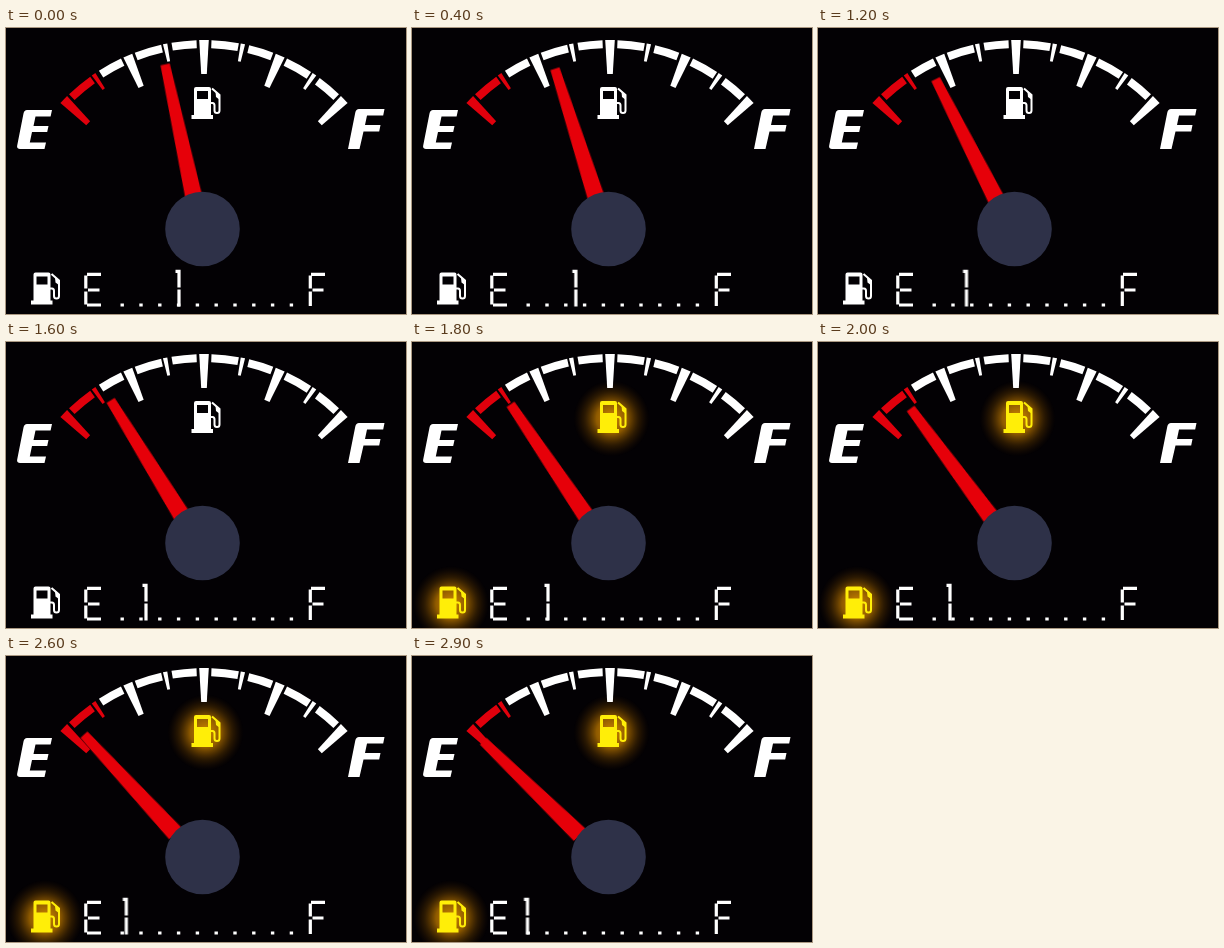
Animation, 400 px wide and 286 px high, one loop 3000 ms. Source, as an HTML page:

```html
<!DOCTYPE html>
<html lang="en">
<head>
<meta charset="utf-8">
<title>Fuel gauge</title>
<style>
  html, body { margin: 0; width: 100%; height: 100%; overflow: hidden; background: #030104; }
  svg { display: block; width: 400px; height: 286px; }

  .needle, .marker, .pumps, .glow { animation: 3s infinite; }
  .needle { fill: #e60009; animation-name: sweep; }
  .marker { animation-name: slide; }
  .pumps { color: #fff; animation-name: warn; animation-timing-function: step-end; }
  .glow { opacity: 0; animation-name: shine; animation-timing-function: step-end; }
  .lcd { fill: none; stroke: #fff; stroke-width: 3.2; }

  @keyframes sweep {
    0% { transform: rotate(-12.2deg); animation-timing-function: steps(7); }
    23.3333% { transform: rotate(-21.9deg); animation-timing-function: steps(5); }
    40% { transform: rotate(-26.8deg); animation-timing-function: steps(4); }
    53.3333% { transform: rotate(-31.7deg); animation-timing-function: steps(4); }
    66.6667% { transform: rotate(-36.5deg); animation-timing-function: steps(4); }
    80% { transform: rotate(-40.7deg); animation-timing-function: steps(5); }
    96.6667%, 100% { transform: rotate(-45.9deg); }
  }
  @keyframes slide {
    0% { transform: translateX(173px); animation-timing-function: steps(7); }
    23.3333% { transform: translateX(157px); animation-timing-function: steps(5); }
    40% { transform: translateX(148.5px); animation-timing-function: steps(4); }
    53.3333% { transform: translateX(140px); animation-timing-function: steps(4); }
    66.6667% { transform: translateX(132px); animation-timing-function: steps(4); }
    80% { transform: translateX(123.5px); animation-timing-function: steps(5); }
    96.6667%, 100% { transform: translateX(115.5px); }
  }
  @keyframes warn { 0% { color: #fff; } 60%, 100% { color: #ffee08; } }
  @keyframes shine { 0% { opacity: 0; } 60%, 100% { opacity: 1; } }
</style>
</head>
<body>
<svg viewBox="0 0 400 286" role="img" aria-label="Fuel gauge running from F to E">
  <defs>
    <radialGradient id="halo">
      <stop offset="0" stop-color="#d28a00"/>
      <stop offset=".4" stop-color="#a86a00" stop-opacity=".85"/>
      <stop offset=".7" stop-color="#6e4200" stop-opacity=".4"/>
      <stop offset="1" stop-color="#3a2000" stop-opacity="0"/>
    </radialGradient>
    <g id="pump">
      <path fill="currentColor" fill-rule="evenodd"
        d="M4.500 1H17.500Q19.500 1 19.500 3V29H21.500V33H0V29H2.500V3Q2.500 1 4.500 1ZM5.500 5V13H16.500V5Z"/>
      <path fill="none" stroke="currentColor" stroke-width="2"
        d="M19 17H21Q23 17 23 19.500V24.500Q23 27 25.500 27T28 24.500V9L20.500 2.500"/>
      <path fill="currentColor" d="M24 6L28.500 9.500V14L24.500 11Z"/>
    </g>
  </defs>

  <rect width="400" height="286" fill="#030104"/>
  <g class="glow" fill="url(#halo)">
    <circle cx="199.500" cy="76.500" r="38"/>
    <circle cx="39" cy="262" r="38"/>
  </g>
  <g id="dial" transform="translate(198 207)"></g>

  <g fill="#fff">
    <path d="M21 82H46L44.600 88.500H29.500L27.500 98H42.500L41.200 104H26L23.800 114.500H40L38.500 121H14Q10.500 121 11.200 117.500L17.500 85.500Q18.200 82 21 82Z"/>
    <path d="M353 81H378.500L377.200 87.500H361L359 97H374.500L373.200 103.500H357.500L353.500 121H342L349.300 84.500Q350 81 353 81Z"/>
  </g>

  <g class="pumps">
    <use href="#pump" x="185.500" y="58"/>
    <use href="#pump" x="25" y="243.500"/>
  </g>

  <g transform="translate(195.800 206)">
    <path class="needle" d="M-4.700-173.500H4.700L8.500-39H-8.500Z"/>
  </g>
  <circle cx="196.500" cy="201" r="37.300" fill="#2e3148"/>

  <g class="lcd">
    <path d="M81 246.300H95M79.800 247.500V260.500M82 262H93.500M79.800 263.500V276.500M81 277H95"/>
    <path d="M305 246.300H319M304.300 247.500V260.500M306.500 262H317.500M304.300 263.500V278"/>
    <path id="dots"/>
    <path class="marker" d="M-3.500 243.300H0M0 241.700V259.500M0 261.500V278.500"/>
  </g>
</svg>
<script>
  const dial = document.getElementById('dial');
  const OUTER = 195, RIM = 187, STEP = 11.5;
  const WHITE = '#fff', RED = '#e0000c';

  const at = (r, deg) => {
    const a = deg * Math.PI / 180;
    return (r * Math.sin(a)).toFixed(2) + ' ' + (-r * Math.cos(a)).toFixed(2);
  };

  function add(d, fill, turn = 0) {
    const p = document.createElementNS('http://www.w3.org/2000/svg', 'path');
    p.setAttribute('d', d);
    p.setAttribute('fill', fill);
    p.setAttribute('transform', `rotate(${turn})`);
    dial.append(p);
  }

  function tick(deg, major, fill) {
    const [top, tip, inner] = major ? [4.8, 2.8, 161] : [2.2, 1.4, 177];
    add(`M${-top} ${-OUTER}H${top}L${tip} ${-inner}H${-tip}Z`, fill, deg);
  }

  function band(from, to, fill) {
    add(`M${at(OUTER, from)}A${OUTER} ${OUTER} 0 0 1 ${at(OUTER, to)}` +
        `L${at(RIM, to)}A${RIM} ${RIM} 0 0 0 ${at(RIM, from)}Z`, fill);
  }

  for (let i = -4; i <= 4; i++) {
    const major = i % 2 === 0, deg = i * STEP;
    tick(deg, major, i < -2 ? RED : WHITE);
    if (i < 4) {
      band(deg + (major ? 2.2 : 1.9), deg + STEP - (major ? 1.2 : 2.2), i < -3 ? RED : WHITE);
    }
  }

  let dots = '';
  for (let i = 0; i < 10; i++) dots += `M${(114.5 + i * 18.8).toFixed(1)} 277h3.400`;
  document.getElementById('dots').setAttribute('d', dots);
</script>
</body>
</html>
```
